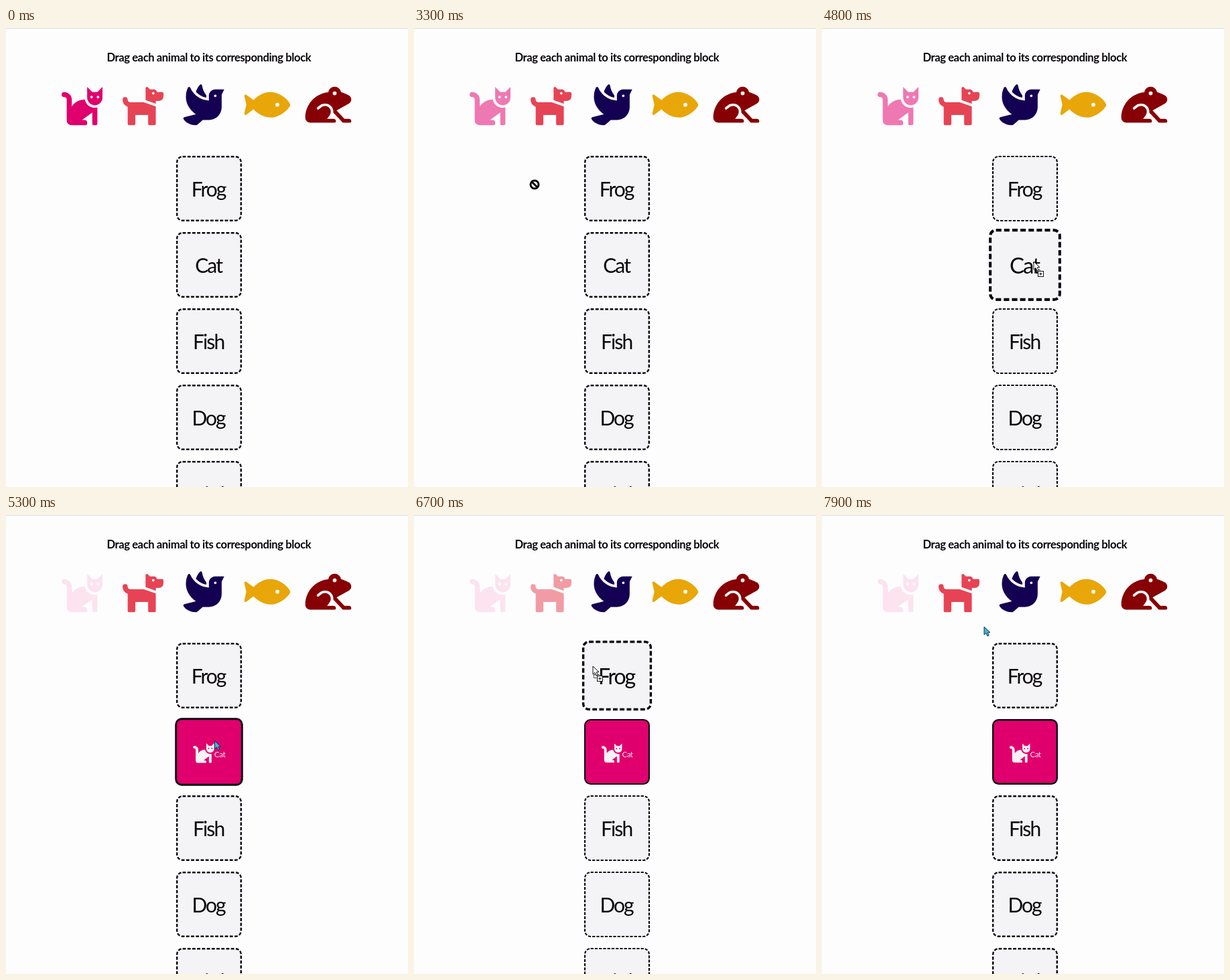
An HTML page with a canvas that plays this animation: 600x686 px, repeating every 8000 ms.

```html
<!DOCTYPE html>
<html lang="en">
<head>
<meta charset="utf-8">
<title>Animal blocks</title>
<style>
html, body { margin: 0; width: 100%; height: 100%; overflow: hidden; background: #fefdfe; }
canvas { display: block; }
</style>
</head>
<body>
<canvas id="stage" width="600" height="686"></canvas>
<script>
const ctx = document.getElementById('stage').getContext('2d');
const LOOP = 8000, STEP = 100;
const UNIT = 61 / 512;
const SIZE = 98, LEFT = 254, TOP = 191, PITCH = 114;

const dot = (x, y, r) => `M${x - r} ${y}a${r} ${r} 0 1 0 ${2 * r} 0a${r} ${r} 0 1 0 ${-2 * r} 0z`;

const shapes = {
  cat: new Path2D(`M291 192C270 192 184 194 128 278V192C128 139 85 96 32 96A32 32 0 0 0 32 160
    Q64 160 64 192V448Q64 512 128 512H304Q320 512 320 496V480Q320 448 288 448H256L384 352V496
    Q384 512 400 512H432Q448 512 448 496V290Q432 294 416 294C354 294 303 250 291 192z
    M448 96H384L320 32V166A96 96 0 0 0 512 166V32z` + dot(376, 160, 16) + dot(456, 160, 16)),
  dog: new Path2D(`M298 224L448 278V496Q448 512 432 512H368Q352 512 352 496V384H192V496
    Q192 512 176 512H112Q96 512 96 496V282C59 269 32 234 32 192A32 32 0 0 1 96 192Q96 224 128 224z
    M544 112V144Q544 208 480 208H448V244L320 198V48C320 34 337 27 347 37L375 64H428
    C439 64 452 72 457 82L464 96H528Q544 96 544 112z` + dot(416, 112, 16)),
  bird: new Path2D(`M288 167V139C260 103 241 60 234 14C232 0 215-5 206 6C185 31 168 60 157 92
    C191 130 237 157 288 167z M400 64C356 64 320 100 320 144V203C216 197 127 133 87 42
    C81 29 64 29 58 41C41 76 32 115 32 157C32 227 66 294 117 342Q137 361 156 375L12 411
    C1 414-3 426 3 436C20 463 63 508 156 512Q168 512 178 504L243 448H320A160 160 0 0 0 480 288
    V128L512 64z` + dot(400, 144, 16)),
  fish: new Path2D(`M327 96C237 96 159 151 115 198L27 132C15 122-3 132 0 146L25 256L0 366
    C-3 380 15 390 27 380L115 314C159 361 237 416 327 416C465 416 576 288 576 256
    S465 96 327 96z` + dot(414, 256, 24)),
  frog: new Path2D(`M447 97A80 80 0 0 0 289 98C127 113 0 250 0 417C0 452 29 480 64 480H368
    Q384 480 384 464Q384 432 352 432H273L308 384C332 347 319 295 275 277C251 267 223 273 202 288
    L170 313A16 16 0 0 1 150 287L185 261C222 234 273 234 310 261C321 269 356 300 351 354L470 480H560
    Q576 480 576 464Q576 432 544 432H490L392 327L546 241A58 58 0 0 0 576 190C576 169 564 149 546 139
    C505 116 447 97 447 97z` + dot(368, 112, 24))
};

const animals = [
  ['cat', 83, '#e0006d'], ['dog', 170.2, '#e64455'], ['bird', 264.7, '#140052'],
  ['fish', 355.7, '#e9a608'], ['frog', 446.7, '#870003']
];
const labels = ['Frog', 'Cat', 'Fish', 'Dog', 'Bird'];
const DROP = 5200;
const drags = { cat: [2650, DROP], dog: [6250, 7400] };
const hovers = { Cat: [3650, DROP], Frog: [6620, 7400] };

// time, x, y of the pointer
const path = [
  [1900, 6, 230], [2500, 112, 122], [2700, 115, 123], [3000, 140, 165], [3300, 180, 234],
  [3600, 240, 337], [3700, 262, 347], [4000, 300, 355], [4800, 316, 349], [5200, 314, 347],
  [5400, 309, 328], [5700, 288, 244], [6000, 236, 160], [6200, 213, 116], [6400, 221, 127],
  [6700, 267, 226], [7000, 290, 243], [7400, 289, 240], [7600, 277, 220], [7900, 242, 167]
];

const within = (t, span) => !!span && t >= span[0] && t < span[1];
const clamp = v => Math.max(0, Math.min(1, v));
const ease = v => { const p = clamp(v); return p * (2 - p); };

function grow(t, span) {
  if (!span) return 0;
  return ease((t - span[0]) / 200) * (1 - ease((t - span[1]) / 250));
}

function pointerAt(t) {
  const i = path.findIndex(k => k[0] >= t);
  if (i < 0) return path[path.length - 1].slice(1);
  if (i === 0) return path[0].slice(1);
  const a = path[i - 1], b = path[i], p = (t - a[0]) / (b[0] - a[0]);
  return [a[1] + (b[1] - a[1]) * p, a[2] + (b[2] - a[2]) * p];
}

function icon(name, x, y, scale, color, alpha = 1) {
  ctx.save();
  ctx.translate(x, y);
  ctx.scale(scale, scale);
  ctx.globalAlpha = alpha;
  ctx.fillStyle = color;
  ctx.fill(shapes[name], 'evenodd');
  ctx.restore();
}

function text(str, x, y, font, color, spacing = 0, align = 'center') {
  ctx.font = font + ' Lato, "Open Sans", sans-serif';
  ctx.letterSpacing = spacing + 'px';
  ctx.textAlign = align;
  ctx.fillStyle = color;
  ctx.fillText(str, x, y);
}

function block(label, i, t, busy) {
  const p = grow(t, hovers[label]), filled = label === 'Cat' && t >= DROP;
  const w = (busy && !p ? 2.1 : 2.4) + 1.3 * p;
  const s = SIZE - w, r = 9.6 - w / 2, half = s / 2;
  ctx.save();
  ctx.translate(LEFT + SIZE / 2, TOP + SIZE / 2 + i * PITCH);
  ctx.scale(1 + p / 10, 1 + p / 10);
  ctx.beginPath();
  ctx.roundRect(-half, -half, s, s, r);
  ctx.fillStyle = filled ? '#e0006d' : '#f4f3f5';
  ctx.fill();
  if (!filled) {
    const length = 4 * (s - 2 * r) + 2 * Math.PI * r;
    const period = length / Math.round(length / (w * 3));
    ctx.setLineDash([w * 2, period - w * 2]);
  }
  ctx.lineWidth = w;
  ctx.strokeStyle = '#0a0610';
  ctx.stroke();
  if (filled) {
    icon('cat', -23, -14.5, UNIT / 2, '#f7f2f5');
    text('Cat', 7.5, 8, '11.5px', '#fbe6f0', -0.5, 'left');
  } else {
    text(label, -0.9, 12, '30px', '#08050c', -1.9);
  }
  ctx.restore();
}

function arrow(fill, line) {
  ctx.beginPath();
  [[0, 0], [0, 12], [3, 9.5], [5, 14], [7.2, 13], [5.3, 8.8], [9, 8.6]]
    .forEach(([x, y]) => ctx.lineTo(x, y));
  ctx.closePath();
  ctx.fillStyle = fill;
  ctx.fill();
  ctx.lineWidth = 1;
  ctx.strokeStyle = line;
  ctx.stroke();
}

function copySign() {
  ctx.strokeStyle = '#111';
  ctx.lineWidth = 1;
  ctx.setLineDash([2, 1]);
  ctx.strokeRect(1.5, 12.5, 8, 5);
  ctx.setLineDash([]);
  arrow('#fff', '#111');
  ctx.fillStyle = '#fff';
  ctx.fillRect(6.5, 14.5, 8, 8);
  ctx.strokeRect(6.5, 14.5, 8, 8);
  ctx.beginPath();
  ctx.moveTo(8.5, 18.5); ctx.lineTo(12.5, 18.5);
  ctx.moveTo(10.5, 16.5); ctx.lineTo(10.5, 20.5);
  ctx.stroke();
}

function denySign() {
  ctx.beginPath();
  ctx.arc(0, 0, 6, 0, Math.PI * 2);
  ctx.fillStyle = '#fff';
  ctx.fill();
  ctx.moveTo(-4, -4);
  ctx.lineTo(4, 4);
  ctx.strokeStyle = '#08080c';
  ctx.lineWidth = 3;
  ctx.stroke();
}

function draw(t) {
  ctx.fillStyle = '#fefdfe';
  ctx.fillRect(0, 0, 600, 686);
  ctx.fillStyle = '#dcdce2';
  ctx.fillRect(0, 0, 600, 1);
  text('Drag each animal to its corresponding block', 302.8, 49.5, 'bold 16.6px', '#08050c', -0.4);

  const over = Object.values(hovers).some(s => within(t, s));
  const held = Object.values(drags).some(s => within(t, s));
  for (const [name, x, color] of animals) {
    const gone = name === 'cat' && t >= DROP;
    icon(name, x, 84.2, UNIT, color, gone ? 0.1 : within(t, drags[name]) ? 0.52 : 1);
  }
  labels.forEach((label, i) => block(label, i, t, over));

  if (t < path[0][0]) return;
  const [x, y] = pointerAt(t);
  ctx.save();
  ctx.translate(x, y);
  if (over) copySign();
  else if (held) denySign();
  else arrow('#3fb4e0', '#123244');
  ctx.restore();
}

function frame() {
  const t = performance.now() % LOOP;
  draw(Math.floor(t / STEP) * STEP);
  requestAnimationFrame(frame);
}
frame();
</script>
</body>
</html>
```
